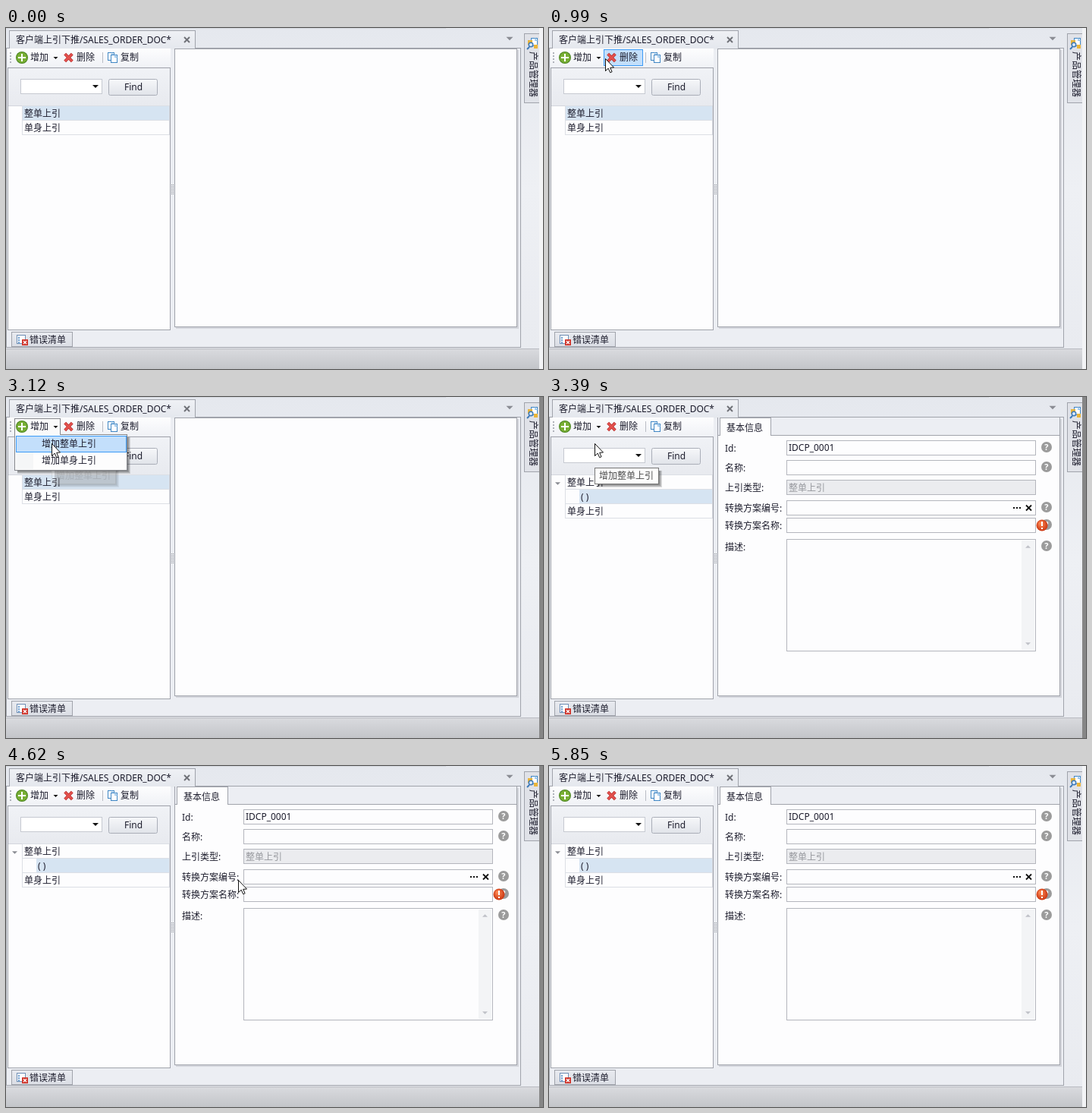
An HTML page with a canvas that plays this animation: 708x449 px, repeating every 6000 ms.

```html
<!DOCTYPE html>
<html lang="zh-CN">
<head>
<meta charset="utf-8">
<title>Form designer</title>
<style>
html, body { margin: 0; width: 100%; height: 100%; overflow: hidden; background: #eaecf1; }
canvas { display: block; }
</style>
</head>
<body>
<canvas id="stage" width="708" height="449"></canvas>
<script>
const ctx = document.getElementById('stage').getContext('2d');
const LOOP = 6000, STEP = 30;
const FONT = '"Noto Sans", "Noto Sans CJK SC", "Noto Sans CJK", sans-serif';
const BORDER = '#a0a3ab', EDGE = '#b4b6bd', GRID = '#dcdfe5', PAPER = '#fdfdfe';
const INK = '#1c1c2c', HOT = '#c3dffb', HOT_EDGE = '#3c9bf7';
const FORM_X = 313, FORM_W = 329, ROW = 19;

// Where the pointer rests between its moves.
const enter = [716, 56], find = [109, 52], del = [74, 40], drop = [64, 39], add = [52, 38],
  item = [60, 61], label = [254, 159], input = [479, 159], leave = [706, 8];

// Each move: start, end, and key points at even times.
const moves = [
  [120, 750, enter, [655, 72], [538, 106], [403, 112], [300, 90], [229, 80], [165, 73], find],
  [750, 990, find, del],
  [1110, 1290, del, drop],
  [1890, 2010, drop, add],
  [2520, 2940, add, item],
  [3810, 4440, item, [75, 103], [158, 151], label],
  [4440, 4980, label, [306, 150], [430, 159], input],
  [5070, 5490, input, [600, 85], leave]
];

const clamp = v => Math.max(0, Math.min(1, v));

function spline(pts, u) {
  const last = pts.length - 1;
  const i = Math.min(Math.floor(u * last), last - 1), f = u * last - i;
  const at = k => pts[Math.max(0, Math.min(last, k))];
  const [a, b, c, d] = [at(i - 1), at(i), at(i + 1), at(i + 2)];
  return [0, 1].map(k => b[k] + f / 2 * (c[k] - a[k] +
    f * (2 * a[k] - 5 * b[k] + 4 * c[k] - d[k] + f * (3 * (b[k] - c[k]) + d[k] - a[k]))));
}

function pointer(t) {
  if (t < 150 || t >= 5490) return null;
  const [start, end, ...pts] = moves.filter(m => m[0] <= t).pop();
  return spline(pts, clamp((t - start) / (end - start))).map(Math.round);
}

function fill(x, y, w, h, color) {
  ctx.fillStyle = color;
  ctx.fillRect(x, y, w, h);
}

function box(x, y, w, h, color, border) {
  fill(x, y, w, h, color);
  ctx.strokeStyle = border;
  ctx.lineWidth = 1;
  ctx.strokeRect(x + .5, y + .5, w - 1, h - 1);
}

function fade(y0, y1, ...colors) {
  const g = ctx.createLinearGradient(0, y0, 0, y1);
  colors.forEach((c, i) => g.addColorStop(i / (colors.length - 1), c));
  return g;
}

function text(s, x, y, color = INK, size = 12, weight = 400) {
  ctx.font = `${weight} ${size}px ${FONT}`;
  ctx.fillStyle = color;
  ctx.fillText(s, x, Math.round(y + 4));
}

function line(color, width, ...pts) {
  ctx.strokeStyle = color;
  ctx.lineWidth = width;
  ctx.beginPath();
  pts.forEach(p => ctx.lineTo(...p));
  ctx.stroke();
}

function shape(color, ...pts) {
  ctx.fillStyle = color;
  ctx.beginPath();
  pts.forEach(p => ctx.lineTo(...p));
  ctx.closePath();
  ctx.fill();
}

function disc(x, y, r, color) {
  ctx.fillStyle = color;
  ctx.beginPath();
  ctx.arc(x, y, r, 0, 7);
  ctx.fill();
}

function cross(x, y, r, color, width) {
  line(color, width, [x - r, y - r], [x + r, y + r]);
  line(color, width, [x + r, y - r], [x - r, y + r]);
}

function arrow(x, y, r, color, dir = 1) {
  shape(color, [x - r, y - dir * r / 2], [x + r, y - dir * r / 2], [x, y + dir * r / 2]);
}

function dots(x, y, n, gap, size, color) {
  for (let i = 0; i < n; i++) fill(x, y + i * gap, size, size, color);
}

function shadow(x, y, w, h) {
  for (let i = 4; i > 0; i--) fill(x + 4, y + 4, w - 4 + i, h - 4 + i, 'rgba(0,0,0,.13)');
}

function page(x, y) {
  box(x, y, 9, 11, '#fff', '#3f86c4');
  shape('#9cc7ec', [x + 5, y], [x + 9, y + 4], [x + 5, y + 4]);
}

function drawSideTab() {
  box(683, 7, 21, 92, '#e0e2e8', BORDER);
  page(692, 13);
  fill(688, 16, 6, 6, '#e9b53c');
  fill(696, 22, 5, 5, '#e9b53c');
  disc(692, 22, 3.5, '#3b78b8');
  disc(692, 22, 2, '#dcebf8');
  line('#3b78b8', 2, [690, 25], [687, 28]);
  ctx.save();
  ctx.translate(695, 31);
  ctx.rotate(Math.PI / 2);
  text('产品管理器', 0, 0);
  ctx.restore();
}

function drawFrame(dark) {
  fill(0, 0, 708, 449, fade(0, 423, '#e5e8ee', '#eef0f4', '#e9ebf0'));
  fill(0, 0, 580, 1, '#d5d8de');
  box(0, 26, 679, 395, '#eceef3', BORDER);
  fill(0, 422, 703, 1, '#b9bbc1');
  fill(0, 423, 703, 26, fade(423, 449, '#d9dade', '#c3c5c9'));

  box(4, 3, 246, 25, fade(3, 28, '#eff1f5', '#e4e7ed'), BORDER);
  fill(5, 26, 244, 2, '#e6e9ee');
  text('客户端上引下推/SALES_ORDER_DOC*', 13, 16);
  cross(238.5, 15.5, 3.5, '#707278', 2);
  arrow(664, 14, 4.5, '#8a8c93');
  drawSideTab();

  box(7, 400, 81, 20, fade(400, 420, '#e9ebf0', '#dadde4'), BORDER);
  box(14, 404, 12, 12, '#fff', '#6f8fb5');
  dots(16, 407, 3, 3, 2, '#6f9fd0');
  fill(21, 410, 8, 8, '#d0372d');
  cross(25, 414, 2, '#fff', 1.3);
  text('错误清单', 31, 411);

  fill(703, 0, 5, 449, dark ? '#868686' : '#f3f4f6');
}

function drawToolbar(hot, open) {
  fill(2, 27, 215, 24, fade(27, 51, PAPER, '#f0f2f6'));
  dots(5, 32, 4, 4, 2, '#b0b3bb');
  if (open) box(11, 28, 61, 23, '#fafafa', '#85878c');
  else if (hot === 'add') box(11, 28, 61, 22, HOT, HOT_EDGE);
  else if (hot === 'del') box(72, 28, 52, 22, HOT, HOT_EDGE);

  disc(21, 39, 8, '#4a8420');
  disc(21, 39, 7, '#78ae34');
  fill(16, 38, 10, 2, '#fff');
  fill(20, 34, 2, 10, '#fff');
  text('增加', 32, 39);
  arrow(65.5, 39.5, 3, '#111');
  cross(82.5, 39, 4.8, '#b52a2a', 4);
  cross(82.5, 39, 4.6, '#e4514d', 2.6);
  text('删除', 93, 39);
  fill(127, 32, 1, 14, '#b9bcc4');
  page(134, 32);
  page(138, 35);
  text('复制', 151, 39);
}

function drawSearch(hot) {
  fill(3, 53, 213, 49, fade(53, 102, '#f0f2f6', '#e8eaef'));
  fill(3, 102, 213, 1, '#d3d6dd');
  box(19, 67, 108, 20, '#fff', '#c6c9d1');
  arrow(118, 77, 4, '#111');
  ctx.fillStyle = hot ? fade(67, 89, '#eaf6fd', '#b9e0f7') : fade(67, 89, '#f7f8fa', '#e0e3e9');
  ctx.strokeStyle = hot ? '#5c9fc9' : '#aaaeb8';
  ctx.lineWidth = 1;
  ctx.beginPath();
  ctx.roundRect(135.5, 67.5, 64, 21, 2);
  ctx.fill();
  ctx.stroke();
  text('Find', 156, 78);
}

function drawList(added) {
  const rows = added ? ['整单上引', '( )', '单身上引'] : ['整单上引', '单身上引'];
  const selected = added ? 1 : 0;
  rows.forEach((name, i) => {
    const y = 103 + i * ROW, child = added && i === 1, indent = child ? 18 : 0;
    box(21, y - 1, 195, ROW + 1, PAPER, GRID);
    if (i === selected) fill(22 + indent, y, 193 - indent, ROW - 1, '#d6e4f2');
    text(name, 24 + indent, y + 10);
  });
  if (added) arrow(11.5, 114, 3.5, '#8a8c93');
}

function helpMark(y) {
  disc(656, y, 7, '#9b9b9b');
  text('?', 653.2, y, '#fff', 11, 700);
}

function errorMark(x, y) {
  const g = ctx.createRadialGradient(x - 2, y - 3, 1, x, y, 8);
  g.addColorStop(0, '#ff8a55');
  g.addColorStop(1, '#c8330f');
  disc(x, y, 7.5, g);
  fill(x - 1, y - 5, 2, 6, '#fff');
  fill(x - 1, y + 3, 2, 2, '#fff');
}

function drawForm() {
  fill(223, 27, 450, 23, '#eceef3');
  fill(223, 50, 450, 1, BORDER);
  box(225, 27, 68, 24, PAPER, BORDER);
  fill(226, 50, 66, 1, PAPER);
  text('基本信息', 234, 41);

  const fields = { 'Id:': 67, '名称:': 93, '上引类型:': 119, '转换方案编号:': 146, '转换方案名称:': 169 };
  for (const [name, y] of Object.entries(fields)) {
    const locked = name === '上引类型:';
    text(name, 232, y + 1);
    box(FORM_X, y - 10, FORM_W, 20, locked ? '#ebecef' : PAPER, EDGE);
    if (!locked) helpMark(y - 1);
  }
  text('IDCP_0001', 316, 67);
  text('整单上引', 316, 120, '#96989d');
  for (let x = 612; x < 622; x += 4) fill(x, 145, 2, 2, '#111');
  cross(632.5, 146, 3.5, '#111', 1.8);
  errorMark(650, 169);

  text('描述:', 232, 198);
  box(FORM_X, 187, FORM_W, 148, PAPER, EDGE);
  fill(623, 189, 17, 144, '#f3f4f6');
  arrow(631.5, 197, 3.5, '#bfc1c7', -1);
  arrow(631.5, 325, 3.5, '#bfc1c7');
  helpMark(196);
}

function drawPanels(findHot, added) {
  box(2, 52, 215, 346, PAPER, BORDER);
  drawSearch(findHot);
  drawList(added);
  dots(218, 206, 7, 2, 1, '#85888f');
  dots(220, 206, 7, 2, 1, '#85888f');
  fill(224, 29, 452, 367, '#d4d6dc');
  box(222, 27, 452, 367, PAPER, BORDER);
  if (added) drawForm();
}

function drawMenu(hot, shaded) {
  if (shaded) shadow(11, 49, 149, 48);
  box(11, 49, 149, 48, '#fdfdfd', '#85878c');
  fill(12, 49, 59, 1, '#fafafa');
  fill(13, 51, 23, 44, '#f5f6f7');
  if (hot) box(13, 51, 146, 22, HOT, HOT_EDGE);
  text('增加整单上引', 47, 62);
  text('增加单身上引', 47, 84);
}

function drawTip(alpha) {
  ctx.save();
  ctx.globalAlpha = Math.sqrt(alpha);
  shadow(60, 93, 85, 22);
  ctx.globalAlpha = alpha;
  box(60, 93, 85, 22, '#fdfdfd', '#767676');
  text('增加整单上引', 66, 104, '#4c4c4c');
  ctx.restore();
}

function drawPointer([x, y]) {
  const pts = [[0, 0], [0, 16], [3.7, 12.6], [6.2, 18.2], [8.6, 17.2], [6.2, 11.8], [11, 11.5]]
    .map(([a, b]) => [x + .5 + a, y + .5 + b]);
  shape('#fff', ...pts);
  line('#111', 1, ...pts, pts[0], pts[1]);
}

function draw(t) {
  const tip = pointer(t), [x, y] = tip || [-1, -1];
  const added = t >= 3300, open = t >= 2190 && t < 3270;
  const hot = y < 50 && t >= 780 && t < 2190 ? (x > 71 ? 'del' : 'add') : '';
  const findHot = t < 780 && x >= 135 && x < 200 && y >= 67 && y < 89;
  const tipAlpha = Math.min(clamp((t - 3090) / 180), clamp((3660 - t) / 240));

  drawFrame(t >= 1560 && t < 5850);
  drawToolbar(hot, open);
  drawPanels(findHot, added);
  // The open menu covers the top edge of the tooltip.
  if (open) shadow(11, 49, 149, t < 2220 ? 44 : 48);
  if (tipAlpha) drawTip(tipAlpha);
  if (open) drawMenu(y >= 51, false);
  if (tip) drawPointer(tip);
}

const start = performance.now();
function tick() {
  const t = (performance.now() - start) % LOOP;
  draw(Math.floor(t / STEP) * STEP);
  requestAnimationFrame(tick);
}
tick();
</script>
</body>
</html>
```
